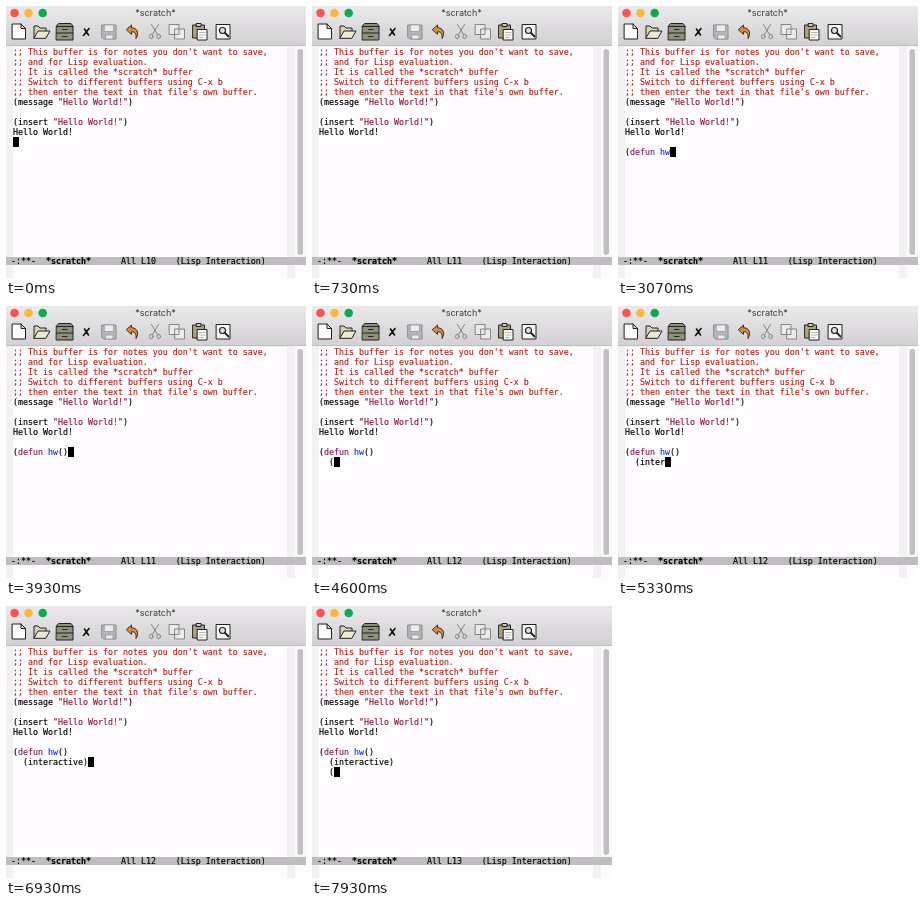
An HTML page that plays this animation: 300x272 px, repeating every 8 s.

```html
<!DOCTYPE html>
<html lang="en">
<head>
<meta charset="utf-8">
<title>*scratch*</title>
<style>
html, body { margin: 0; width: 100%; height: 100%; overflow: hidden; background: #fefcfe; }
svg { position: absolute; left: 0; top: 0; }
pre {
  position: absolute; margin: 0; color: #000;
  font: 8.305px/10px "DejaVu Sans Mono", monospace;
  -webkit-text-stroke: .15px;
}
#buffer { left: 7px; top: 41px; }
#mode { left: 5px; top: 250px; }
#cursor { position: absolute; width: 5.5px; height: 10px; background: #000; }
.c { color: #a8281e; }
.s { color: #861a3a; }
.k { color: #7c2460; }
.f { color: #1238d8; }
</style>
</head>
<body>
<svg width="300" height="272" viewBox="0 0 300 272">
  <defs>
    <linearGradient id="chrome" x2="0" y2="1">
      <stop stop-color="#ebe9eb"/><stop offset="1" stop-color="#d2d0d2"/>
    </linearGradient>
  </defs>
  <rect width="300" height="40" fill="url(#chrome)"/>
  <path d="M0 39.7H300" stroke="#b4b4b4" stroke-width=".7"/>
  <circle cx="8.5" cy="7" r="4.3" fill="#f6564e"/>
  <circle cx="22.5" cy="7" r="4.3" fill="#fbb93c"/>
  <circle cx="36.700" cy="7" r="4.3" fill="#12a850"/>
  <text x="149.500" y="10.300" text-anchor="middle" font-family="Inter, sans-serif" font-size="9" fill="#3a3a3a">*scratch*</text>

  <g stroke="#222" stroke-linejoin="round" stroke-linecap="round" fill="none">
    <!-- new, open, cabinet, close -->
    <path d="M6.500 18H15L19.500 22.500V33H6.500ZM15 18V22.500H19.500" fill="#fcfcfc"/>
    <path d="M28 32V20H32L34 22H40V25" fill="#d8d3b8"/>
    <path d="M28 32L32 25H44L40 32Z" fill="#ece8d2"/>
    <path d="M50.500 20L52.500 17.500H65L67 20V34H50.500Z" fill="#8f917a"/>
    <path d="M50.500 20.500H67M50.500 27H67M56.500 23.500H61M56.500 30.500H61"/>
    <path d="M77.500 29.500L83 22.500M78.500 23L82.500 29" stroke="#111" stroke-width="1.6"/>
    <!-- save, dimmed -->
    <path d="M96 19H110V33H97.500L96 31.500Z" fill="#b4b8bc" stroke="#888"/>
    <path d="M98.500 19H107.500V25.500H98.500ZM100 29H107V33H100Z" fill="#ececec" stroke="#999" stroke-width=".8"/>
    <!-- undo -->
    <path d="M120.500 23.500L125.500 19V21.700C131 21.700 133.500 27 130 32.500C130.500 28 129 25.700 125.500 25.700V28Z" fill="#d98a3c" stroke-width=".9"/>
    <!-- cut and copy, dimmed -->
    <g stroke="#858585">
      <path d="M145.500 18.500L151.500 28.500M152.500 18.500L146.500 28.500"/>
      <ellipse cx="145.300" cy="30.500" rx="1.800" ry="2.200"/>
      <ellipse cx="152.700" cy="30.500" rx="1.800" ry="2.200"/>
      <path d="M163.500 18.500H173V28.500H163.500ZM169 23H178.500V33H169Z" fill="#ebebeb"/>
    </g>
    <!-- paste, search -->
    <path d="M187 19H198.500V32H187Z" fill="#b5a27c"/>
    <path d="M190.500 17.500H195V20.500H190.500Z" fill="#ccc"/>
    <path d="M191.500 23.500H201V34H191.500Z" fill="#fafafa"/>
    <path d="M193.500 26.500H199M193.500 29H199M193.500 31.500H197" stroke="#999" stroke-width=".7"/>
    <path d="M210.500 18.500H224V33H210.500Z" fill="#f6f6f6"/>
    <circle cx="216.500" cy="24.500" r="3" fill="#dde3e6" stroke-width="1.2"/>
    <path d="M219 27L222.500 30.500" stroke-width="1.8"/>
  </g>

  <path d="M0 40H7V272H0ZM281 40H289V272H281Z" fill="#f3f1f3"/>
  <rect x="289" y="40" width="11" height="211" fill="#faf8fa"/>
  <rect x="291.500" y="43" width="5.500" height="206" rx="2.750" fill="#c1bfc1"/>
  <rect y="251" width="300" height="8" fill="#bfbdbf"/>
</svg>
<div id="cursor"></div>
<pre id="buffer"></pre>
<pre id="mode"></pre>

<script>
const LOOP = 8000;
const intro = `<span class="c">;; This buffer is for notes you don't want to save,
;; and for Lisp evaluation.
;; It is called the *scratch* buffer
;; Switch to different buffers using C-x b
;; then enter the text in that file's own buffer.</span>
(message <span class="s">"Hello World!"</span>)

(insert <span class="s">"Hello World!"</span>)
Hello World!
`;
const keys = "\n(defun hw()\n(interactive)\n(";
const keyTimes = [
  270, 870, 1070, 1200, 1330, 1470, 1530, 1600, 2930, 3070, 3530, 3670,
  4070, 4600, 4930, 5130, 5200, 5270, 5330, 5470, 5670, 5870, 6000, 6070, 6130, 6600,
  7070, 7800
];
const cursorOff = [[730, 870], [2130, 2600], [7600, 7800]];
const el = id => document.getElementById(id);
let last = -1;

// A newline inside the function indents the next line by two columns.
function typedText(count) {
  return keys.slice(0, count).replace(/(?!^)\n/g, "\n  ");
}

function highlight(text) {
  return text
    .replace(/defun (\w+)/, 'defun <span class="f">$1</span>')
    .replace("defun", '<span class="k">defun</span>');
}

function draw(t) {
  const count = keyTimes.filter(k => k <= t).length;
  if (count !== last) {
    last = count;
    const text = typedText(count);
    const lines = text.split("\n");
    const row = 9 + lines.length - 1;
    el("buffer").innerHTML = intro + highlight(text);
    el("mode").innerHTML = `-:**-  <b>*scratch*</b>      All L${row + 1}    (Lisp Interaction)`;
    el("cursor").style.left = 7 + 5 * lines.at(-1).length + "px";
    el("cursor").style.top = 41 + 10 * row + "px";
  }
  const off = cursorOff.some(([from, to]) => t >= from && t < to);
  el("cursor").style.visibility = off ? "hidden" : "visible";
}

const start = performance.now();
function tick() {
  draw((performance.now() - start) % LOOP);
  requestAnimationFrame(tick);
}
tick();
</script>
</body>
</html>
```
